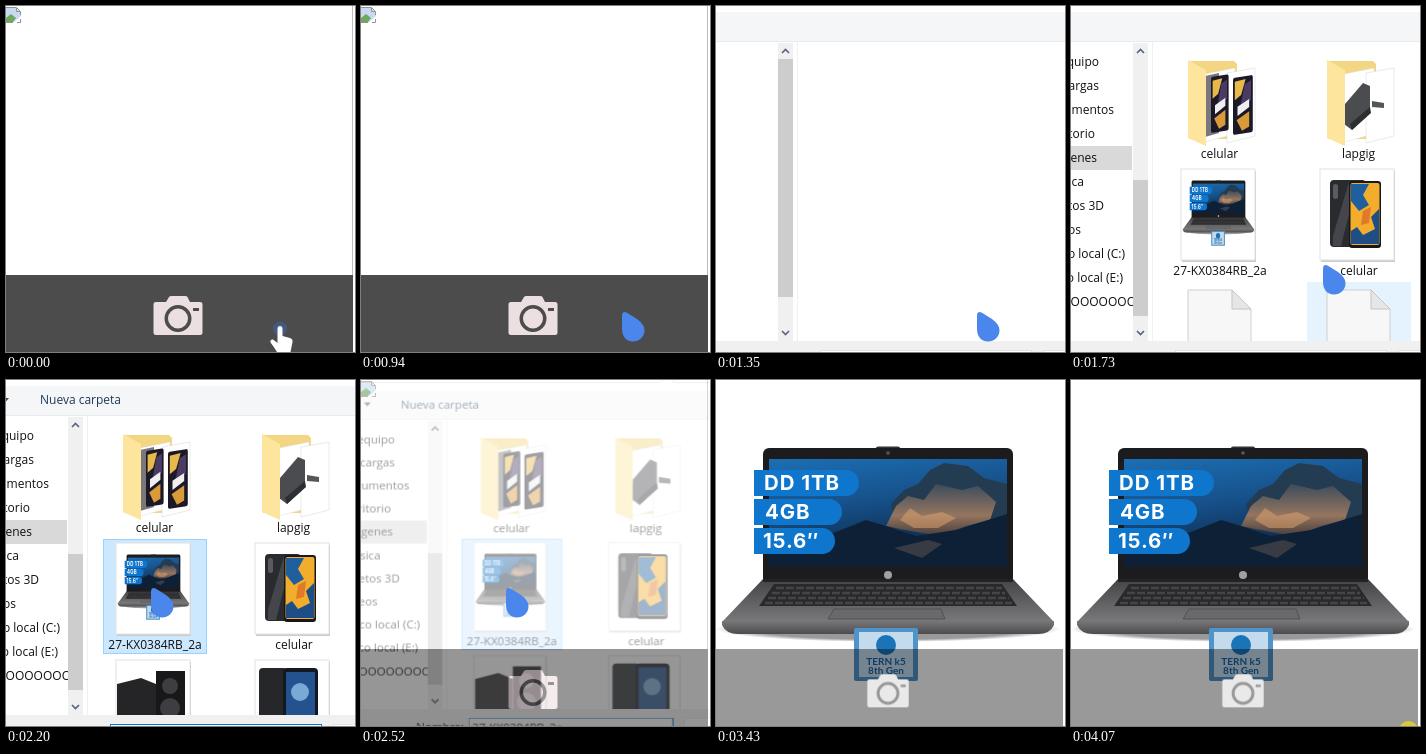
Write an HTML page that moves like this. It is 349 px wide and 346 px high and loops after 4220 ms.

```html
<!DOCTYPE html>
<html lang="es">
<head>
<meta charset="utf-8">
<title>Subir imagen</title>
<style>
html, body { margin: 0; width: 100%; height: 100%; overflow: hidden; background: #fff; }
svg { display: block; width: 349px; height: 346px; }
text { font: 12px "Open Sans", "Noto Sans", sans-serif; fill: #111; }
.mid text { text-anchor: middle; }
.nav text { text-anchor: end; }
.tags text { font: 700 20.5px Inter, sans-serif; letter-spacing: .9px; fill: #fff; }
.badge text { font: 700 10px Lato, sans-serif; fill: #1763a5; text-anchor: middle; }

/* hard switches */
.step { animation: 4.22s step-end infinite; }
.empty { animation-name: empty; }
.loaded { animation-name: loaded; }
.bar { animation-name: bar; }
.cam { animation-name: cam; transform-origin: 172px 318px; }
.thumb { animation-name: thumb; }
.nav { animation-name: nav; }
.files { animation-name: files; }
.docs { animation-name: docs; }
.pics { animation-name: pics; }
.hover1 { animation-name: hover1; }
.hover2 { animation-name: hover2; }
.hover3 { animation-name: hover3; }
.picked { animation-name: picked; }
.dot { animation-name: dot; }
@keyframes empty { 0% { opacity: 1 } 61.13%, 100% { opacity: 0 } }
@keyframes loaded { 0% { opacity: 0 } 61.13%, 100% { opacity: 1 } }
@keyframes bar { 0% { fill-opacity: .7 } 76.06%, 100% { fill-opacity: .4 } }
@keyframes cam {
  0% { fill: #ecdfe1; transform: none }
  76.06%, 100% { fill: #e9e9e9; transform: scale(.845) }
}
@keyframes thumb {
  0% { transform: translate(0, 53px) scale(1, 238) }
  32.94%, 100% { transform: translate(0, 174px) scale(1, 136) }
}
@keyframes nav { 0% { opacity: 0 } 32.94%, 100% { opacity: 1 } }
@keyframes files { 0% { opacity: 0 } 35.07%, 100% { opacity: 1 } }
@keyframes docs { 0% { opacity: 1 } 46.92%, 100% { opacity: 0 } }
@keyframes pics { 0% { opacity: 0 } 46.92%, 100% { opacity: 1 } }
@keyframes hover1 { 0% { opacity: 0 } 37.44% { opacity: 1 } 43.84%, 100% { opacity: 0 } }
@keyframes hover2 { 0% { opacity: 0 } 43.84% { opacity: 1 } 46.92%, 100% { opacity: 0 } }
@keyframes hover3 { 0% { opacity: 0 } 46.92% { opacity: 1 } 52.13%, 100% { opacity: 0 } }
@keyframes picked { 0% { opacity: 0 } 52.13%, 100% { opacity: 1 } }
@keyframes dot { 0% { opacity: 0 } 96.44%, 100% { opacity: 1 } }

/* continuous motion */
.dialog { transform-origin: 205px 150px; animation: dialog 4.22s linear infinite; }
.hand { animation: hand 4.22s linear infinite; }
.glow { animation: glow 4.22s linear infinite; }
.drop { animation: drop 4.22s linear infinite; }
.grow { transform-origin: 10px 15px; animation: grow 4.22s linear infinite; }
@keyframes dialog {
  0%, 26.7% { opacity: 0; transform: scale(.97) }
  27.96% { opacity: .65; transform: scale(.983) }
  30.81%, 55.69% { opacity: 1; transform: none }
  59.72% { opacity: .42; transform: scale(.967) }
  61.12% { opacity: .2; transform: scale(.955) }
  61.13%, 100% { opacity: 0; transform: scale(.95) }
}
@keyframes hand {
  0%, 1.66% { transform: none; opacity: 1 }
  11.14%, 15.17% { transform: translate(2px, -8px); opacity: 1 }
  19%, 100% { transform: translate(2px, -8px); opacity: 0 }
}
@keyframes glow { 0%, 1.66% { opacity: .5 } 11.14%, 100% { opacity: 0 } }
@keyframes drop {
  0%, 40.97% { transform: translate(262px, 305px) }
  40.98%, 42.6% { transform: translate(253px, 258px); animation-timing-function: ease-in-out }
  52.13%, 76.05% { transform: translate(146px, 207px) }
  76.06%, 100% { transform: translate(151px, 216px) }
}
@keyframes grow {
  0%, 15.17% { transform: scale(.2); opacity: 0 }
  22.27%, 77% { transform: none; opacity: 1 }
  81.28%, 100% { transform: scale(.4); opacity: 0 }
}
</style>
</head>
<body>
<svg viewBox="0 0 349 346">
<defs>
  <linearGradient id="sky" x2=".3" y2="1">
    <stop offset="0" stop-color="#1c6fb4"/><stop offset=".45" stop-color="#17528c"/><stop offset="1" stop-color="#0a2240"/>
  </linearGradient>
  <linearGradient id="town" x2="0" y2="1">
    <stop offset="0" stop-color="#3c4c5c"/><stop offset=".6" stop-color="#94755f"/><stop offset="1" stop-color="#4a3d3c"/>
  </linearGradient>
  <linearGradient id="deck" x2="0" y2="1">
    <stop offset="0" stop-color="#444447"/><stop offset="1" stop-color="#79797b"/>
  </linearGradient>
  <linearGradient id="lip" x2="0" y2="1">
    <stop offset="0" stop-color="#77777a"/><stop offset="1" stop-color="#4c4c4f"/>
  </linearGradient>
  <radialGradient id="shade">
    <stop offset=".8" stop-color="#000" stop-opacity=".4"/><stop offset="1" stop-color="#000" stop-opacity="0"/>
  </radialGradient>

  <g id="laptop">
    <ellipse cx="172" cy="249" rx="172" ry="13" fill="url(#shade)"/>
    <rect x="47" y="68" width="250" height="136" rx="6" fill="#1c1c1e"/>
    <path d="M160 68Q160 66.500 162 66.500H182Q184 66.500 184 68Z" fill="#333"/>
    <circle cx="172" cy="73" r="1.800" fill="#55585f"/>
    <rect x="53" y="79" width="238" height="108" fill="url(#sky)"/>
    <path d="M175 124 188 110 202 104 214 90 228 83 252 86 268 98 291 104V150H180Z" fill="#243c52"/>
    <path d="M170 146 180 126 192 116 208 120 220 104 246 110 262 106 280 122 274 140 250 146 224 156 200 152Z" fill="url(#town)"/>
    <path d="M184 140 194 128 206 136 226 132 240 138 222 148 198 148Z" fill="#d9a06c" opacity=".55"/>
    <path d="M53 172 80 163 120 152 150 140 170 146 200 156 240 150 291 134V187H53Z" fill="#0d2036"/>
    <path d="M178 168 212 160 226 164 206 178Z" fill="#6e5a55" opacity=".45"/>
    <path d="M47 199H297L338 242H6Z" fill="url(#deck)"/>
    <path d="M6 241H338V245Q334 254 322 254H22Q10 254 6 245Z" fill="url(#lip)"/>
    <path d="M47 199H297V202H47Z" fill="#222224"/>
    <path d="M58 204H286L301 226H43Z" fill="#29292b"/>
    <path d="M60 208H286M56 213H289M52 218H293M49 223H296" stroke="#454549" stroke-width="2.500" stroke-dasharray="8 2"/>
    <path d="M118 229H225L229 239H112Z" fill="#69696c" stroke="#515154"/>
    <circle cx="172" cy="195" r="4" fill="#a0a0a3"/>
    <g fill="#0f76cd">
      <path d="M38 90H130a13 13 0 0 1 0 26H38Z"/>
      <path d="M38 119H113a13 13 0 0 1 0 26H38Z"/>
      <path d="M38 148H106a13 13 0 0 1 0 26H38Z"/>
    </g>
    <g class="tags">
      <text x="48" y="110">DD 1TB</text>
      <text x="49" y="139">4GB</text>
      <text x="47" y="168">15.6″</text>
    </g>
    <g class="badge">
      <rect x="138" y="248" width="64" height="53" rx="2" fill="#4f93c8"/>
      <rect x="143" y="252" width="54" height="45" fill="#c3dbec"/>
      <circle cx="170" cy="265" r="10" fill="#1b74b7"/>
      <text x="170" y="285">TERN k5</text>
      <text x="170" y="294">8th Gen</text>
    </g>
  </g>

  <g id="folder">
    <path d="M118 55H163L166 58V133H118Z" fill="#f3d681"/>
    <path d="M134 68 164 62V128L134 136Z" fill="#fff" stroke="#ddd" stroke-width=".5"/>
    <path d="M156 67 184 62V130L156 137Z" fill="#fff" stroke="#d5d5d5" stroke-width=".5"/>
  </g>
  <path id="flap" d="M117 54 135 64V140L117 132Z" fill="#fde59d"/>
  <g id="page">
    <rect x="111" y="165" width="74" height="91" fill="#ccc"/>
    <rect x="110" y="163" width="74" height="91" fill="#fff" stroke="#e2e2e2"/>
  </g>
  <g id="doc">
    <path d="M117 284H161L180 303V360H117Z" fill="#f7f7f7" stroke="#cfcfcf"/>
    <path d="M161 284V303H180Z" fill="#e6e6e6" stroke="#c4c4c4"/>
  </g>
  <g id="phone">
    <rect width="32" height="67" rx="3" fill="#15171b"/>
    <rect x="1.500" y="2" width="29" height="62" rx="2" fill="#f2ad2d"/>
    <path d="M2 3H20L14 14 20 24 10 30 2 20Z" fill="#1f5f9e"/>
    <path d="M30 28 22 36 26 48 14 54 8 46 2 50V63H30Z" fill="#1d4f86"/>
    <path d="M14 30 22 26 20 42 12 44Z" fill="#e07a28"/>
  </g>
  <g id="poster">
    <rect width="22" height="56" rx="2" fill="#1b1927"/>
    <path d="M2 4 14 3 9 18 2 22Z" fill="#e6b94a"/>
    <path d="M13 8 20 5V24L8 30Z" fill="#4b3a63"/>
    <path d="M5 29 18 23V31L5 38Z" fill="#f1eef0"/>
    <path d="M4 42 18 35V50L10 53Z" fill="#d99b3a"/>
  </g>
</defs>

<rect width="349" height="346" fill="#fff"/>
<g class="step empty">
  <path d="M0 2H10L15 7V16H0Z" fill="#c9d9f2"/>
  <path d="M0 16V12L5 8 10 12 7 16Z" fill="#6ea75d"/>
  <path d="M15 10 8 16H15Z" fill="#fff"/>
  <path d="M0 1.500H10.500L14.500 5.500V9M10.500 2V5.500H14M0 16.500H7M11 16.500H14.500V13" fill="none" stroke="#929292"/>
  <path d="M346.500 0V269" stroke="#bdbdbd"/>
</g>
<use href="#laptop" class="step loaded"/>
<rect class="step bar" y="269" width="347" height="77"/>
<path class="step cam" fill-rule="evenodd" d="M150 296H160L163 291Q164 290 165 290H179Q181 290 181.500 291L184 296H194Q196.500 296 196.500 298V327Q196.500 329 194 329H150Q147.500 329 147.500 327V298Q147.500 296 150 296Z
  M158.500 312.500a13.500 13.500 0 1 0 27 0a13.500 13.500 0 1 0-27 0Z M162 312.500a10 10 0 1 0 20 0a10 10 0 1 0-20 0Z M187 302H193V305H187Z"/>
<circle class="step dot" cx="337.500" cy="351" r="10" fill="#d8c93a"/>

<g class="dialog">
  <rect x="-60" y="-60" width="480" height="480" fill="#fff"/>
  <rect x="-60" y="6" width="480" height="29" fill="#f5f6f7"/>
  <path d="M-60 35.500H420" stroke="#e8eaec"/>
  <path d="M-60-2.500H302Q305-2.500 305-6V-20M316-20V-2.500H400" fill="none" stroke="#d9d9d9"/>
  <g class="step pics">
    <text x="34" y="24" style="fill:#1e395b">Nueva carpeta</text>
    <path d="M-4 18H3L-.5 22Z" fill="#444"/>
  </g>

  <g class="step nav">
    <rect x="-60" y="140" width="121" height="24" fill="#d9d9d9"/>
    <text x="28" y="60">Este equipo</text>
    <text x="28" y="84">Descargas</text>
    <text x="43" y="108">Documentos</text>
    <text x="24" y="132">Escritorio</text>
    <text x="26" y="156">Imágenes</text>
    <text x="13" y="180">Música</text>
    <text x="33" y="204">Objetos 3D</text>
    <text x="10" y="228">Vídeos</text>
    <text x="54" y="252">Disco local (C:)</text>
    <text x="52" y="276">Disco local (E:)</text>
    <text x="65" y="300">OOOOOOOOO</text>
  </g>
  <rect x="62" y="37" width="15" height="298" fill="#f0f0f0"/>
  <rect class="step thumb" x="62" width="15" height="1" fill="#cdcdcd"/>
  <path d="M66 47 69.500 43.500 73 47M66 325 69.500 328.500 73 325" fill="none" stroke="#56657f" stroke-width="1.700"/>
  <path d="M81.500 36V335" stroke="#f0f0f0"/>

  <g class="step files mid">
    <rect class="step hover1" x="236" y="276" width="104" height="90" fill="#e5f3ff"/>
    <rect class="step hover2" x="236" y="159" width="104" height="115" fill="#e5f3ff"/>
    <rect class="step hover3" x="97" y="159" width="104" height="115" fill="#e5f3ff"/>
    <rect class="step picked" x="97.500" y="159.500" width="103" height="114" fill="#cce8ff" stroke="#99d1ff"/>

    <use href="#folder"/>
    <path d="M134 70 148 67V127L134 131Z" fill="#77777c"/>
    <g transform="translate(140 71) skewY(-9) scale(.8 1)"><use href="#poster"/></g>
    <g transform="translate(162 72) skewY(-9) scale(.9 1.020)"><use href="#poster"/></g>
    <use href="#flap"/>
    <text x="148.500" y="152">celular</text>

    <g transform="translate(139)"><use href="#folder"/></g>
    <path d="M274 98 292 77 299 80V107L281 124 273 118Z" fill="#4b4c50"/>
    <path d="M279 118 299 101 300 107 281 124Z" fill="#2d2e31"/>
    <path d="M301 95 313 97V102L301 101Z" fill="#55565a"/>
    <g transform="translate(139)"><use href="#flap"/></g>
    <text x="287.500" y="152">lapgig</text>

    <use href="#page"/>
    <g transform="translate(110.500 155.500) scale(.215 .28)"><use href="#laptop"/></g>
    <text x="149" y="269">27-KX0384RB_2a</text>

    <g transform="translate(139)"><use href="#page"/></g>
    <rect x="259" y="174" width="36" height="67" rx="4" fill="#2a2b2f"/>
    <path d="M262 230 278 176H286L270 240H262Z" fill="#45464b"/>
    <rect x="262" y="178" width="5" height="15" rx="2.500" fill="#5a5b60"/>
    <g transform="translate(278 175)"><use href="#phone"/></g>
    <text x="288" y="269">celular</text>

    <g class="step docs">
      <use href="#doc"/>
      <g transform="translate(139)"><use href="#doc"/></g>
    </g>
    <g class="step pics">
      <g transform="translate(0 117)"><use href="#page"/></g>
      <g transform="translate(139 117)"><use href="#page"/></g>
      <path d="M111 304 135 298 150 304V346H111Z" fill="#252528"/>
      <rect x="150" y="291" width="29" height="55" fill="#18181a"/>
      <circle cx="164" cy="306" r="8" fill="#3e3e42"/>
      <circle cx="164" cy="328" r="10" fill="#3e3e42"/>
      <rect x="253" y="288" width="28" height="58" rx="4" fill="#26272b"/>
      <rect x="277" y="288" width="35" height="58" rx="4" fill="#141821"/>
      <rect x="280" y="292" width="29" height="50" fill="#24528f"/>
      <circle cx="294" cy="312" r="9" fill="#79a9d6"/>
    </g>
  </g>

  <rect x="-60" y="335" width="480" height="90" fill="#f0f0f0"/>
  <rect x="104.500" y="344.500" width="211" height="20" fill="#fff" stroke="#e2e2e2"/>
  <rect x="327.500" y="344.500" width="90" height="20" fill="#fff" stroke="#e2e2e2"/>
  <text x="50" y="358">Nombre:</text>
  <g class="step picked">
    <rect x="104.500" y="344.500" width="211" height="20" fill="#fff" stroke="#0078d7"/>
    <text x="108" y="358">27-KX0384RB_2a</text>
  </g>
</g>

<circle class="glow" cx="274" cy="322.500" r="7" fill="#3a66b4"/>
<path class="hand" fill="#fff" d="M271.500 323Q271.500 320 274 320T276.500 323V330L284 332Q287 333 286.500 336L284.500 346H271Q268 341 264.500 336.500Q264 333 267 333.500L271.500 337Z"/>
<g class="drop">
  <path class="grow" fill="#4a86ec" d="M-1 5C-1 0 2 0 6 3L14 8C19 12 21.500 15 21.500 19.500C21.500 26 16 30.500 10 30.500C3 30.500-1 25-1 18Z"/>
</g>
</svg>
</body>
</html>
```
